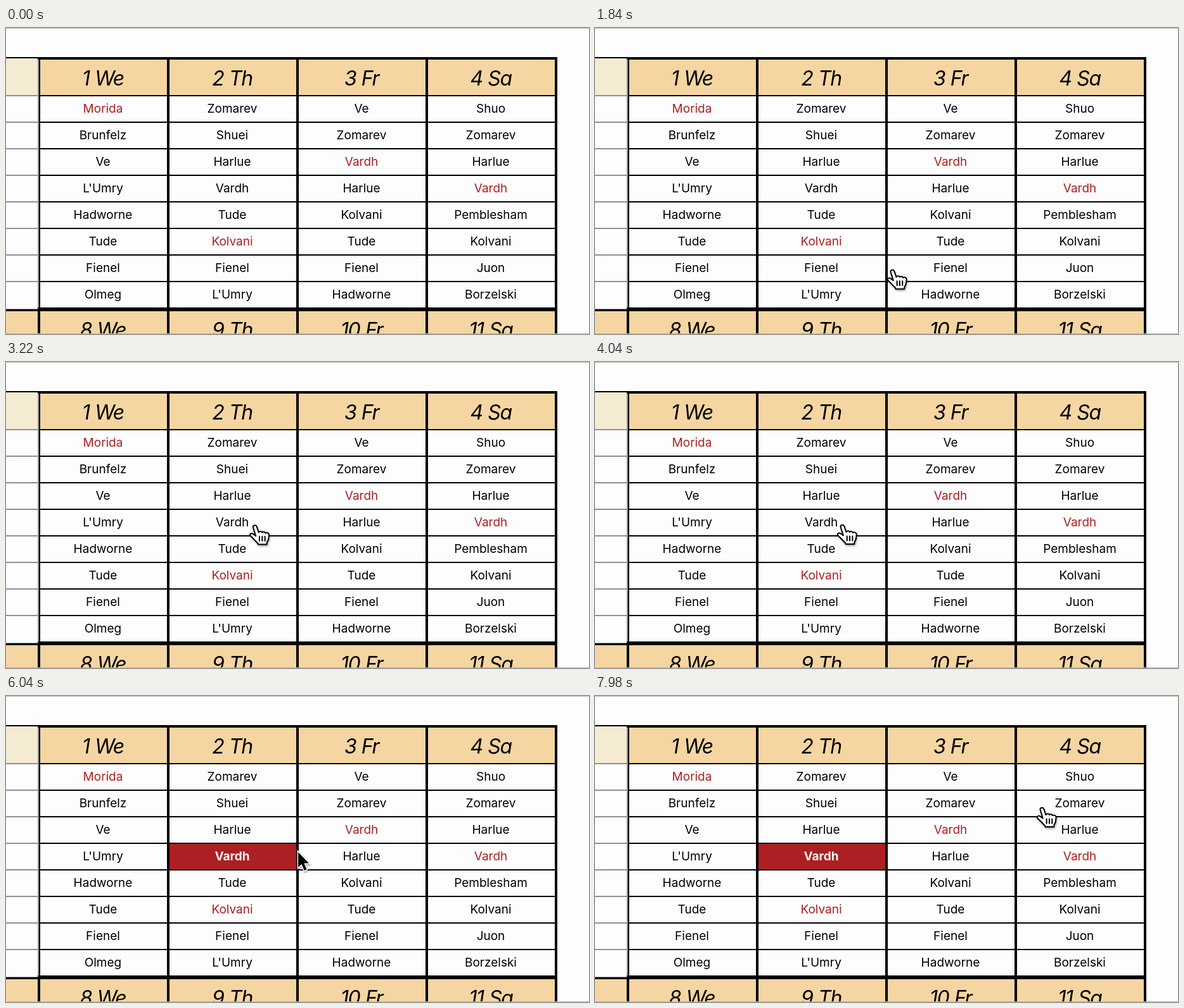
Recreate the animation shown at these times as an HTML page. Size 920 by 484 pixels, loop 8000 ms.

```html
<!DOCTYPE html>
<html lang="en">
<head>
<meta charset="utf-8">
<title>Shift calendar</title>
<style>
  html, body { margin: 0; height: 100%; overflow: hidden; background: #fdfdfd; }
  svg { display: block; width: 100vw; height: 100vh; }
  text { font: 19px Inter, "Open Sans", sans-serif; text-anchor: middle; }
  .day { font-size: 32px; font-style: italic; letter-spacing: -1.4px; word-spacing: 1px; }
  .fixed { fill: #ab2020; }
  .picked { fill: #fdf6f0; font-weight: 700; }
  #cursor { filter: drop-shadow(1px 2px 1.5px rgba(0, 0, 0, .35)); }
</style>
</head>
<body>
<svg viewBox="0 0 920 484">
  <g id="table"></g>
  <path d="M0 .5H920M0 483.5H920" stroke="#b4b4b4"/>
  <g id="cursor">
    <g id="hand" fill="#fff" stroke="#000" stroke-width="2" stroke-linejoin="round" stroke-linecap="round">
      <path d="M-3.5 2.5C-3.5 -.5 1 -1.5 2.2 1.5L5.5 11C7 8.5 10.5 9 11 11C12.5 9.3 15.5 10 16 12C18 10.7 21.5 11.5 21.7 14.5L21 21C20.6 24 18.5 25.5 18.3 28V30H4.5L4 28C1 25.5 -2.5 21 -7.5 16.5C-10 13.5 -6 11.5 -3.5 13.3L.8 16.5Z"/>
      <path d="M6.7 17.5v7M11 17.5v7M15.3 17.5v7"/>
    </g>
    <path id="arrow" d="M1 1V25L6.3 20L10.6 30L14.5 28.3L10.2 18.5H17.8Z" stroke="#fff" stroke-width="3" paint-order="stroke"/>
  </g>
</svg>
<script>
const LOOP = 8000, PICK_TIME = 5300;
const COLUMN = 204, ROW = 42, LEFT = 52, FIRST_ROW = 107;
const HEADER = "#f5d6a2", SIDE_LINE = "#918e99";
const DAYS = [["1 We", "2 Th", "3 Fr", "4 Sa"], ["8 We", "9 Th", "10 Fr", "11 Sa"]];
// A leading asterisk marks a fixed shift.
const SHIFTS = [
  "*Morida Brunfelz Ve L'Umry Hadworne Tude Fienel Olmeg",
  "Zomarev Shuei Harlue Vardh Tude *Kolvani Fienel L'Umry",
  "Ve Zomarev *Vardh Harlue Kolvani Tude Fienel Hadworne",
  "Shuo Zomarev Harlue *Vardh Pemblesham Kolvani Juon Borzelski"
].map(names => names.split(" "));
// Cursor path: time, x, y
const PATH = [
  [0, 560, 535], [900, 540, 500], [1840, 470, 383], [2660, 417, 267], [3400, 391, 258],
  [5300, 391, 258], [6040, 460, 246], [7020, 630, 220], [8000, 706, 177]
];

const byId = id => document.getElementById(id);

function add(tag, attributes, content = "") {
  const node = document.createElementNS("http://www.w3.org/2000/svg", tag);
  for (const name in attributes) node.setAttribute(name, attributes[name]);
  node.textContent = content;
  return byId("table").appendChild(node);
}
const box = (x, y, width, height, fill) => add("rect", { x, y, width, height, fill });
const label = (content, x, y, kind = "") => add("text", { x, y, class: kind }, content);

box(0, 48, LEFT, 59, "#f4ebd2");
box(LEFT, 48, 816, 59, HEADER);
box(0, 446, 868, 38, HEADER);
const pickedBox = box(258, 234, 200, 40, "#ac1f22");

for (let row = 0; row < 8; row++) {
  const y = FIRST_ROW + row * ROW - 1;
  box(0, y, LEFT, 2, SIDE_LINE);
  box(LEFT, y, 816, 2, "#000");
}
for (let column = 0; column < 5; column++) box(LEFT - 2 + column * COLUMN, 46, 4, 438, "#000");
box(LEFT - 2, 48, 2, 396, SIDE_LINE);
box(0, 46, LEFT, 2, "#000");
box(LEFT - 2, 46, 820, 4, "#000");
box(0, 444, LEFT, 1, SIDE_LINE);
box(0, 445, LEFT, 3, "#000");
box(LEFT - 2, 442, 820, 6, "#000");

let pickedText;
SHIFTS.forEach((names, column) => {
  const x = LEFT + 101 + column * COLUMN;
  DAYS.forEach((week, i) => label(week[column], x, 90.5 + i * 398, "day"));
  names.forEach((name, row) => {
    const fixed = name.startsWith("*");
    const node = label(name.replace("*", ""), x, 134 + row * ROW, fixed ? "fixed" : "");
    if (column === 1 && row === 3) pickedText = node;
  });
});

// Smooth curve through the path points, resting where neighbours are equal.
function pathValue(time, axis) {
  const i = Math.min(PATH.findLastIndex(point => point[0] <= time), PATH.length - 2);
  const slope = k => (PATH[k + 1][axis] - PATH[k][axis]) / (PATH[k + 1][0] - PATH[k][0]);
  const tangent = k => {
    if (k === 0 || k === PATH.length - 1) return 0;
    const before = slope(k - 1), after = slope(k);
    return before * after <= 0 ? 0 : 2 * before * after / (before + after);
  };
  const [start, end] = [PATH[i], PATH[i + 1]];
  const span = end[0] - start[0], u = (time - start[0]) / span;
  const ease = u * u * (3 - 2 * u);
  return start[axis] + (end[axis] - start[axis]) * ease
    + span * u * (1 - u) * ((1 - u) * tangent(i) - u * tangent(i + 1));
}

function draw(now) {
  const time = now % LOOP;
  const x = pathValue(time, 1), y = pathValue(time, 2);
  const picked = time >= PICK_TIME;
  const pointing = y < 443 && (!picked || x > 666);
  byId("cursor").setAttribute("transform", `translate(${x} ${y})`);
  byId("hand").style.display = pointing ? "" : "none";
  byId("arrow").style.display = pointing ? "none" : "";
  pickedBox.style.display = picked ? "" : "none";
  pickedText.setAttribute("class", picked ? "picked" : "");
}

const origin = performance.now();
function tick() {
  draw(performance.now() - origin);
  requestAnimationFrame(tick);
}
tick();
</script>
</body>
</html>
```
